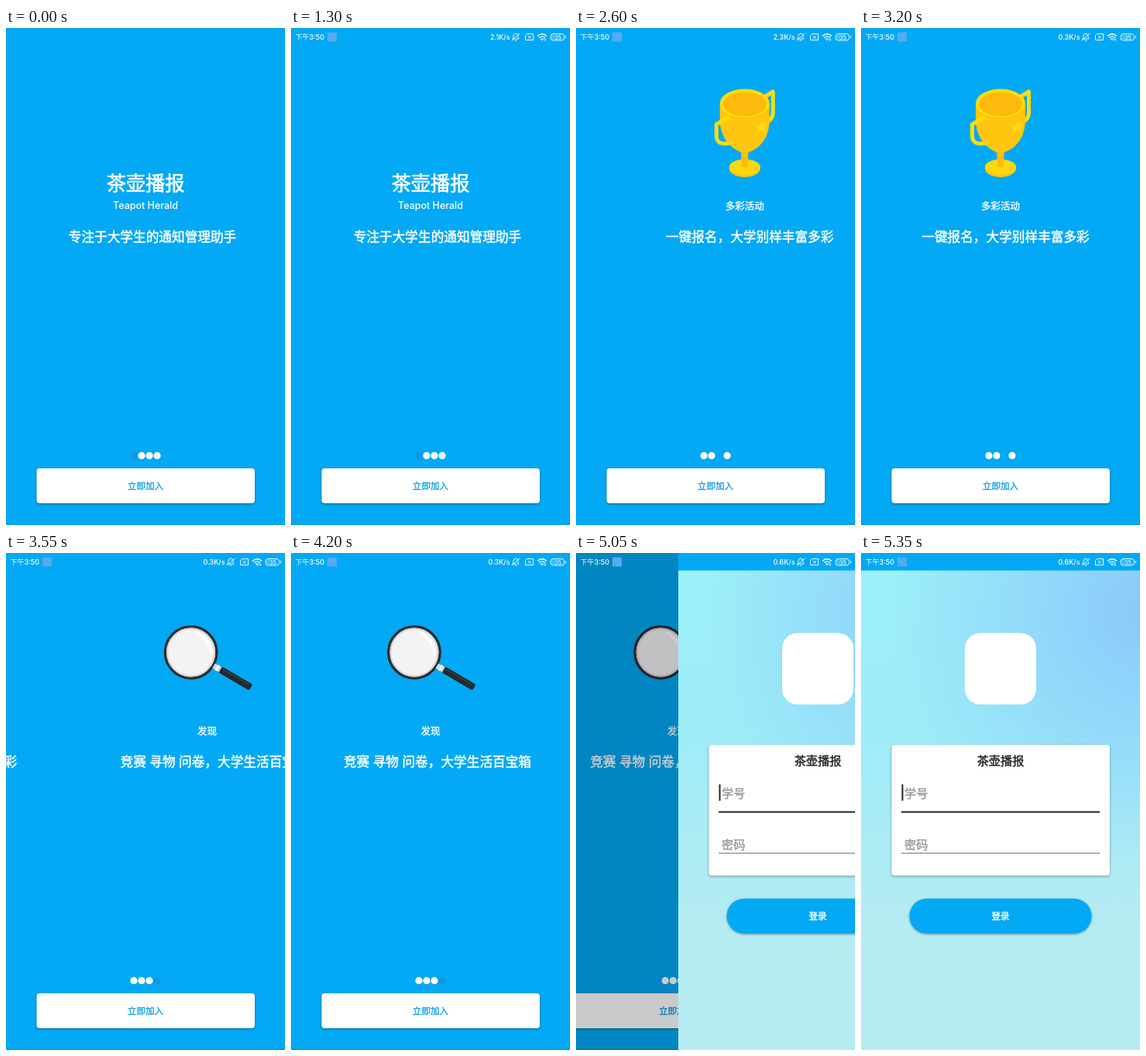
Recreate the animation shown at these times as an HTML page. Size 360x640 px, loop 5.4 s.

```html
<!DOCTYPE html>
<html lang="zh-CN">
<head>
<meta charset="utf-8">
<title>茶壶播报</title>
<style>
  html, body { margin: 0; width: 100%; height: 100%; overflow: hidden; background: #03a9f4; }
  svg { display: block; width: 360px; height: 640px; }
  /* The thin stroke gives the CJK glyphs a medium weight. */
  text {
    font-family: Inter, "Noto Sans CJK SC", "Noto Sans CJK", sans-serif; font-weight: 500;
    color: #fff; fill: currentColor; stroke: currentColor; stroke-width: .028em;
  }
  .mid { text-anchor: middle; }
  .name { font-size: 25.2px; }
  .head { font-size: 12.5px; }
  .body { font-size: 16.67px; }
  .btn { font-size: 11.6px; }
  .hint { font-size: 15.2px; color: #999; }
  .line { fill: none; stroke-linecap: round; stroke-linejoin: round; }
  .raised { filter: drop-shadow(0 1px 1.5px rgba(0, 0, 0, .4)); }
  #status text { font-size: 9px; stroke: none; }
</style>
</head>
<body>
<svg viewBox="0 0 360 640">
  <defs>
    <linearGradient id="sky" x2="0" y2="1">
      <stop offset="0" stop-color="#9cf0f8"/>
      <stop offset=".35" stop-color="#9decf8"/>
      <stop offset=".75" stop-color="#b5ebf2"/>
    </linearGradient>
    <radialGradient id="glow" gradientUnits="userSpaceOnUse" cx="365" cy="75" r="330">
      <stop offset="0" stop-color="#8ac9fb"/>
      <stop offset="1" stop-color="#8ac9fb" stop-opacity="0"/>
    </radialGradient>
  </defs>

  <g id="intro">
    <rect width="460" height="640" fill="#03a9f4"/>
    <g id="pages">
      <g>
        <text class="mid name" x="180" y="209">茶壶播报</text>
        <text class="mid head" x="180" y="233" style="stroke:none">Teapot Herald</text>
        <text class="mid body" x="189" y="275">专注于大学生的通知管理助手</text>
      </g>

      <g transform="translate(360)">
        <path fill="#bccae0" d="M124 125Q124 120 128 118L188 84.5Q190 83.5 193 85L201 90 136 126V183L126 179Q124 178 124 175Z"/>
        <path fill="#e9eef8" d="M131 131Q131 125 136 122L196 90Q201 88 201 94V142L157 169 146 187 144 178 136 182Q131 184 131 178Z"/>
        <path fill="#c5d1e4" d="M137 182L144 178 146 187Z"/>
        <path class="line" stroke="#d3dbe9" stroke-width="4" d="M152 128L193 105M139 147L174 127M180 134L193 126M139 158L186 131M139 170L174 150"/>
        <path class="line" stroke="#f6d93c" stroke-width="6" d="M139 135.500L144 132.500"/>
        <path fill="#34e07f" d="M187 125Q187 119 193 120L233 142Q237 144 237 149V176Q237 179 233 180L222 185 215 176 191 163Q187 160 187 156Z"/>
        <path fill="#3bd083" d="M196 124L233 144Q236 146 236 150V175L222 184 215 175 191 161Q196 158 196 152Z"/>
        <g class="line" stroke="#b9f4d2" stroke-width="1.600">
          <path stroke-width="6" d="M207.500 144L208 152"/>
          <path d="M202 149Q203 158 208.500 159T213.500 154M208 159V163M205 162L211 165"/>
        </g>
        <text class="mid head" x="180" y="233.500">通知</text>
        <text class="mid body" x="189" y="275">便捷群组，通知传达更准确。</text>
      </g>

      <g transform="translate(720)">
        <g transform="translate(-38)">
          <path class="line" stroke="#ffdc0b" stroke-width="5" d="M243 89L254.500 82V110Q254 118 245 122"/>
          <ellipse cx="218" cy="181" rx="20" ry="11" fill="#ffc60f"/>
          <ellipse cx="218" cy="179" rx="20" ry="10" fill="#ffd80b"/>
          <path fill="#fdbb0c" d="M213 154H223L222 178Q218 181 214 178Z"/>
          <path fill="#ffc60f" d="M186 96V120C187 143 201 155 213 160H223C237 155 249 143 250 120V96Z"/>
          <ellipse cx="218" cy="97" rx="32" ry="18.500" fill="#ffdc0b"/>
          <ellipse cx="218" cy="98" rx="28" ry="15.500" fill="#fdb90c"/>
          <path class="line" stroke="#ffdc0b" stroke-width="5" d="M196 116L181.500 124V139Q182 152 199 148"/>
          <path fill="#ffdc0b" d="M241 118L242 124 247 123 243 129 245 134 239 132 234 135 235 129 232 126 238 125Z"/>
        </g>
        <text class="mid head" x="180" y="233.500">多彩活动</text>
        <text class="mid body" x="186.500" y="275">一键报名，大学别样丰富多彩</text>
      </g>

      <g transform="translate(1080)">
        <g transform="translate(159 128)">
          <circle r="33.200" fill="#f3f3f6" stroke="#2a2e31" stroke-width="3.500"/>
          <circle r="30.500" fill="none" stroke="#d6d8db" stroke-width="2"/>
          <path fill="#fff" d="M5-27A28 28 0 0 1 27 4Q21-15 5-27Z"/>
          <g transform="rotate(30.3)">
            <rect x="34" y="-3.500" width="12" height="7" fill="#d5d8da"/>
            <rect x="38" y="-4" width="3" height="8" fill="#f5f6f7"/>
            <rect x="44" y="-4.500" width="45.500" height="9" rx="2.500" fill="#25292c"/>
            <path stroke="#41464a" d="M47-2H87"/>
          </g>
        </g>
        <text class="mid head" x="180" y="233.500">发现</text>
        <text class="mid body" x="189" y="275">竞赛 寻物 问卷，大学生活百宝箱</text>
      </g>
    </g>

    <g id="dots" fill="#fff">
      <circle cx="165" cy="550.700" r="4.600"/>
      <circle cx="175" cy="550.700" r="4.600"/>
      <circle cx="185" cy="550.700" r="4.600"/>
      <circle cx="195" cy="550.700" r="4.600"/>
    </g>
    <rect id="join" x="39.500" y="567" width="281.500" height="45" rx="4" fill="#fff"/>
    <text class="mid btn" x="180" y="594.300" style="color:#0a9fe6">立即加入</text>
    <rect y="638.500" width="460" height="1.500" opacity=".08"/>
  </g>
  <rect id="shade" width="360" height="640"/>

  <g id="login">
    <rect width="360" height="640" fill="url(#sky)"/>
    <rect width="360" height="640" fill="url(#glow)"/>
    <rect width="360" height="22.500" fill="#03a9f4"/>
    <rect x="134" y="103" width="92" height="92" rx="20" fill="#fff"/>
    <rect class="raised" x="39.500" y="247" width="281.500" height="168.500" rx="4" fill="#fff"/>
    <text class="mid" x="180" y="272.500" style="font-size:15.200px;color:#222">茶壶播报</text>
    <text class="hint" x="56" y="314.500">学号</text>
    <text class="hint" x="56" y="380.500">密码</text>
    <path stroke="#222" stroke-width="2" d="M53.500 298V319M52 333.500H308"/>
    <path stroke="#777" d="M52 386.500H308"/>
    <rect class="raised" x="62.500" y="445" width="235" height="45" rx="22.500" fill="#03a9f4"/>
    <text class="mid btn" x="180" y="472.300">登录</text>
  </g>

  <g id="status">
    <text x="5.500" y="15.300">下午3:50</text>
    <rect x="47" y="5.500" width="12" height="12" rx="1.500" fill="#55aaf0"/>
    <text id="speed" x="282.500" y="15.300" text-anchor="end"></text>
    <g class="line" stroke="#fff" stroke-width=".9">
      <path d="M286 14H294Q293 13 293 10.500C293 6 287 6 287 10.500Q287 13 286 14M289 16H291M285 16L295 7"/>
      <path d="M305 7.500H312.500V15.500H302.500V10ZM306 10L309.500 13.500M309.500 10L306 13.500"/>
      <path stroke-width="1.300" d="M318.500 10Q324 5.500 329.500 10M320.500 12.300Q324 9.500 327.500 12.300M322.500 14.300Q324 13.300 325.500 14.300M324 16V16M328 14V16"/>
      <rect x="335" y="7.500" width="17.500" height="8.500" rx="3.500"/>
      <path d="M354.500 10.500V13"/>
    </g>
    <rect x="336" y="8.500" width="5" height="6.500" rx="2" fill="#fff" opacity=".25"/>
    <text class="mid" x="344.500" y="14.600" style="font-size:7.500px">35</text>
  </g>
</svg>
<script>
  const LOOP = 5400, DRAG = 200, SETTLE = 500;
  const SWIPES = [1400, 2248, 3254];
  const SPEEDS = [[4600, '0.6'], [3150, '0.3'], [1700, '2.3'], [0, '2.1']];
  const $ = id => document.getElementById(id);
  const clamp = v => Math.min(1, Math.max(0, v));
  const shift = (id, x) => $(id).setAttribute('transform', `translate(${x})`);

  // The finger drags 35% of the way, then the page settles with a quintic ease-out.
  const swipe = t => .35 * clamp(t / DRAG) ** 2 + .65 * (1 - (1 - clamp((t - DRAG) / SETTLE)) ** 5);

  function draw(t) {
    const page = SWIPES.reduce((sum, s) => sum + swipe(t - s), 0);
    const active = SWIPES.filter(s => t >= s + DRAG).length;
    shift('pages', -360 * page);
    [...$('dots').children].forEach((dot, i) => {
      dot.style.fill = i !== active ? '#fff' : i % 3 ? '#03a9f4' : '#1597dc';
    });

    const press = Math.sin(Math.PI * clamp((t - 4450) / 450));
    $('join').style.filter = `drop-shadow(0 ${1 + 2 * press}px ${1.5 + press}px rgba(0,0,0,.4))`;

    const open = 1 - (1 - clamp((t - 4901) / 380)) ** 2;
    shift('intro', -78.6 * open);
    shift('login', Math.round(360 * (1 - open)));
    $('shade').style.opacity = .33 * open;

    $('status').style.opacity = clamp(t / 450);
    $('speed').textContent = SPEEDS.find(s => t >= s[0])[1] + 'K/s';
  }

  const start = performance.now();
  function tick() {
    draw((performance.now() - start) % LOOP);
    requestAnimationFrame(tick);
  }
  tick();
</script>
</body>
</html>
```
